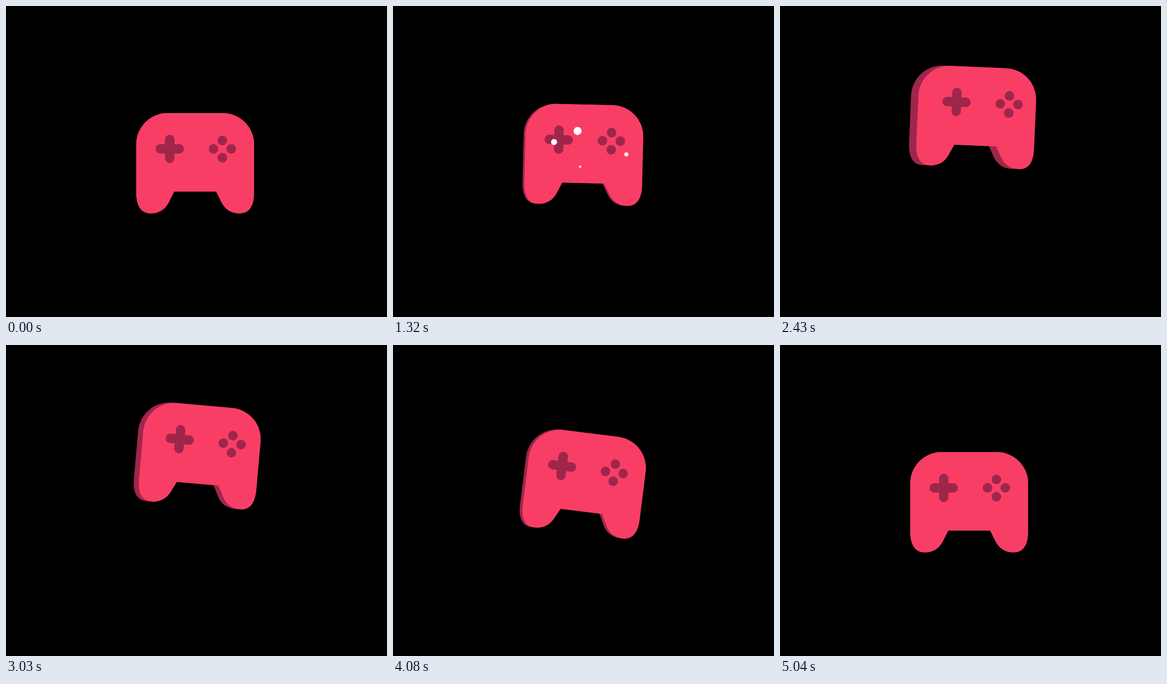
An HTML page for the animation above (5070 ms loop, 708x578 px).

```html
<!DOCTYPE html>
<html lang="en">
<head>
<meta charset="utf-8">
<title>Floating controller</title>
<style>
html, body { margin: 0; width: 100%; height: 100%; overflow: hidden; background: #000; }
svg { display: block; width: 708px; height: 578px; }
</style>
</head>
<body>
<svg viewBox="0 0 708 578">
  <defs>
    <path id="body" d="M300 199H403A58 58 0 0 1 461 257V346C461 372 452 385.5 434 385.5C419 385.5 407 378 400.5 365L390.5 345H312.5L302.5 365C296 378 284 385.5 269 385.5C251 385.5 242 372 242 346V257A58 58 0 0 1 300 199Z"/>
  </defs>
  <g id="pad">
    <use href="#body" fill="#9f264b"/>
    <use id="front" href="#body" fill="#f93e66"/>
    <g id="keys" fill="#9f264b">
      <path d="M286.6 265.5H321.8M304.2 247.9V283.1" stroke="#9f264b" stroke-width="17.5" stroke-linecap="round"/>
      <circle cx="402" cy="250" r="8.9"/>
      <circle cx="385.5" cy="265.5" r="8.9"/>
      <circle cx="418.5" cy="265.5" r="8.9"/>
      <circle cx="402" cy="282" r="8.9"/>
    </g>
  </g>
  <g id="dots" fill="#fff"></g>
</svg>
<script>
const LOOP = 5070;
const get = id => document.getElementById(id);
const clamp = v => Math.min(1, Math.max(0, v));
const mix = (a, b, p) => a + (b - a) * p;
const ease = p => (1 - Math.cos(Math.PI * p)) / 2;

// Eases from pose to pose; each pose is [time, value].
const through = poses => t => {
  const i = poses.findIndex(pose => pose[0] > t);
  const [t0, a] = poses[i - 1], [t1, b] = poses[i];
  return mix(a, b, ease((t - t0) / (t1 - t0)));
};

const lift = through([[0, 0], [800, 0], [2680, -90], [2800, -90], [LOOP, 0]]);
const tilt = through([[0, 0], [2450, 2.4], [3750, 8.8], [4900, 0], [LOOP, 0]]);

// The front plate swings from side to side, and the keys swing further.
const swings = [0, 960, 1740, 2680, 3590, 4420, LOOP];
const swing = values => through(swings.map((time, i) => [time, values[i]]));
const plate = swing([0, 22.5, -21, 20.3, -13, 15.2, 0]);
const keys = swing([0, 14, -17.8, 14.5, -9.5, 7.4, 0]);

// Each dot rises from one [x, y, radius] to another.
const RISE = 720, TOP = 1890;
const dots = [
  [[362, 355, 13.5], [325, 116, 1.7]],
  [[316.5, 336, 8], [283, 174, 3.2]],
  [[356, 360, 0], [340, 240.5, 4.2]],
  [[403.5, 385.5, 4.3], [462, 172, 3.2]]
].map(ends => {
  const el = document.createElementNS("http://www.w3.org/2000/svg", "circle");
  get("dots").append(el);
  return { el, ends };
});

function drawDot({ el, ends: [from, to] }, i, t) {
  const p = (t - RISE) / (TOP - RISE);
  const [x, y, r] = from.map((v, k) => mix(v, to[k], p));
  const pop = clamp((t - 570 - 30 * i) / 60);
  el.setAttribute("cx", x);
  el.setAttribute("cy", y);
  el.setAttribute("r", Math.max(0, r * pop));
  el.setAttribute("opacity", clamp((2110 - 51 * i - t) / 120));
}

function draw(t) {
  const x = plate(t);
  get("pad").setAttribute("transform", `translate(0 ${lift(t)}) rotate(${tilt(t)} 351.5 292)`);
  get("front").setAttribute("transform", `translate(${x} 0)`);
  get("keys").setAttribute("transform", `translate(${x + keys(t)} 0)`);
  dots.forEach((dot, i) => drawDot(dot, i, t));
}

const origin = performance.now();
function tick() {
  draw((performance.now() - origin) % LOOP);
  requestAnimationFrame(tick);
}
tick();
</script>
</body>
</html>
```
